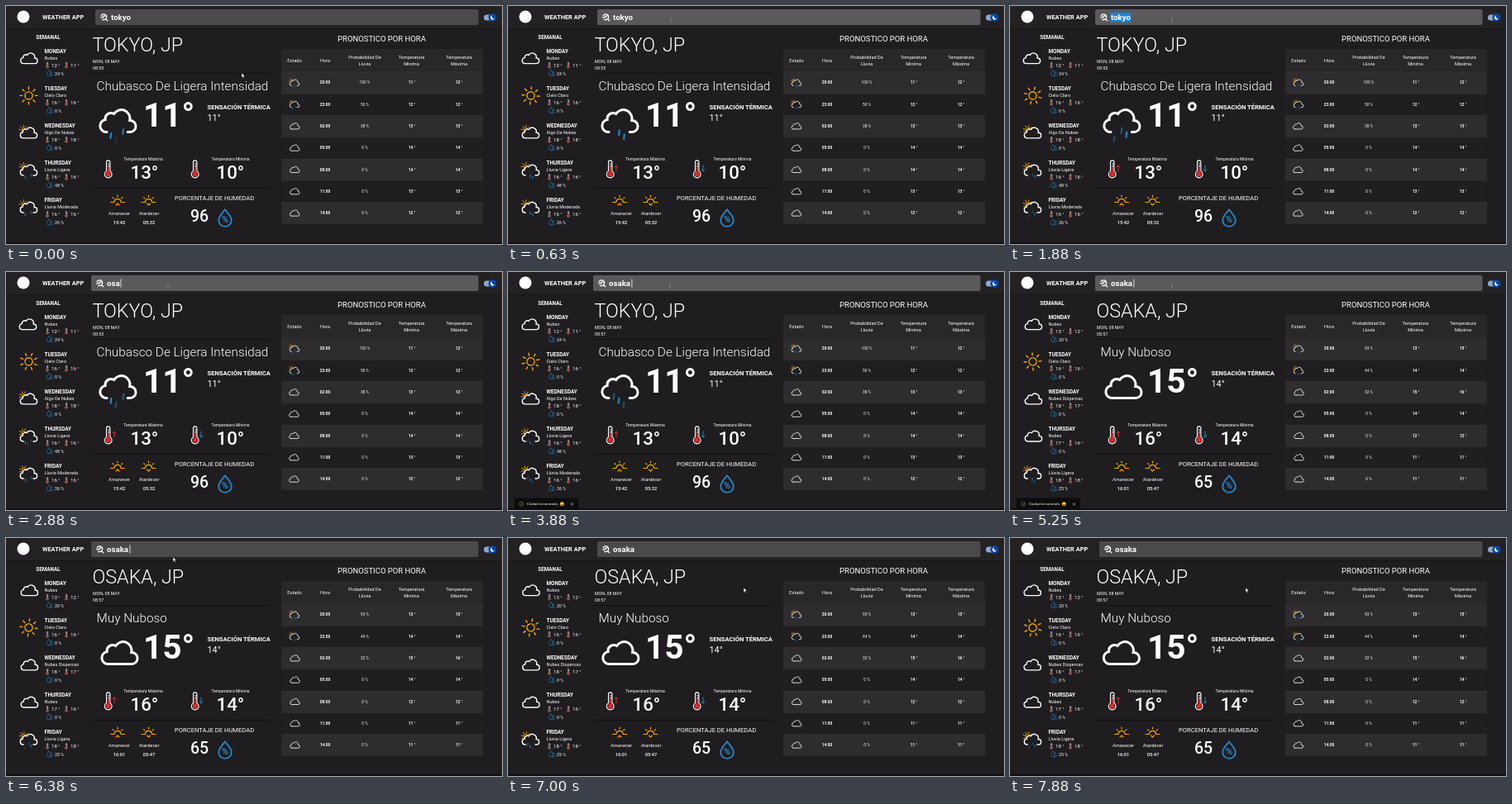
An HTML page for the animation above (8010 ms loop, 600 by 288 pixels).

```html
<!DOCTYPE html>
<html lang="es">
<head>
<meta charset="utf-8">
<title>Weather app</title>
<style>
html, body { margin: 0; width: 100%; height: 100%; overflow: hidden; background: #1f1d1f; }
svg { display: block; width: 600px; height: 288px; font-family: Roboto, "Liberation Sans", sans-serif; }
</style>
</head>
<body>
<svg id="stage" viewBox="0 0 600 288"></svg>
<script>
const LOOP = 8010, STEP = 125, LAST = 63;
const PAGE = '#1f1d1f', BLUE = '#2885c7', ORANGE = '#f8a618', RED = '#e22b2b';

// Day: icon, description, max, min, rain. Hour: rain, min, max.
const tokyo = {
  city: 'TOKYO, JP', sky: 'Chubasco De Ligera Intensidad', icon: 'rain',
  now: 11, feels: 11, max: 13, min: 10, rise: '15:42', set: '05:32', humidity: 96,
  days: [['cloud', 'Nubes', 12, 11, 24], ['sun', 'Cielo Claro', 16, 16, 0],
    ['partly', 'Algo De Nubes', 18, 18, 0], ['shower', 'Lluvia Ligera', 16, 16, 48],
    ['shower', 'Lluvia Moderada', 16, 16, 26]],
  hours: [[100, 11, 12], [50, 12, 12], [38, 13, 13], [0, 14, 14], [0, 14, 14], [0, 13, 13], [0, 12, 12]]
};
const osaka = {
  city: 'OSAKA, JP', sky: 'Muy Nuboso', icon: 'cloud',
  now: 15, feels: 14, max: 16, min: 14, rise: '16:01', set: '05:47', humidity: 65,
  days: [['cloud', 'Nubes', 13, 12, 20], ['sun', 'Cielo Claro', 16, 16, 0],
    ['cloud', 'Nubes Dispersas', 18, 17, 0], ['cloud', 'Nubes', 17, 16, 0],
    ['shower', 'Lluvia Ligera', 18, 18, 25]],
  hours: [[93, 13, 15], [44, 14, 14], [32, 15, 16], [0, 14, 14], [0, 12, 12], [0, 11, 11], [0, 11, 11]]
};
const dayNames = ['MONDAY', 'TUESDAY', 'WEDNESDAY', 'THURSDAY', 'FRIDAY'];
const hourNames = ['20:00', '23:00', '02:00', '05:00', '08:00', '11:00', '14:00'];

// Pointer path: step, x, y
const path = [[0, 286, 84], [1, 286, 84], [3, 232, 42], [5, 197, 17], [10, 196, 17],
  [49, 196, 17], [51, 203, 26], [55, 286, 63], [63, 286, 63]];

const text = (x, y, size, str, weight = 400, anchor = 'start', fill = '#fff') =>
  `<text x="${x}" y="${y}" font-size="${size}" font-weight="${weight}" text-anchor="${anchor}" fill="${fill}">${str}</text>`;
const mid = (x, y, size, str, weight, fill) => text(x, y, size, str, weight, 'middle', fill);
const rect = (x, y, w, h, fill, r = 0) =>
  `<rect x="${x}" y="${y}" width="${w}" height="${h}" rx="${r}" fill="${fill}"/>`;
const circle = (x, y, r, fill) => `<circle cx="${x}" cy="${y}" r="${r}" fill="${fill}"/>`;
const line = (d, color, width, more = '') =>
  `<path d="${d}" fill="none" stroke="${color}" stroke-width="${width}" stroke-linecap="round" stroke-linejoin="round" ${more}/>`;
const at = (x, y, s, body, turn = 0) =>
  `<g transform="translate(${x} ${y}) scale(${s}) rotate(${turn})">${body}</g>`;

function rays(from, to, start, count) {
  let d = '';
  for (let i = 0; i < count; i++) {
    const a = (start + i * 45) * Math.PI / 180, c = Math.cos(a), s = Math.sin(a);
    d += `M${c * from} ${s * from}L${c * to} ${s * to}`;
  }
  return d;
}

// Weather icons live on a 64 x 64 grid.
const sun = (x, y, s, width, t) => at(x, y, s,
  `<circle r="9.7" fill="none" stroke="${ORANGE}" stroke-width="${width}"/>` +
  line(rays(16.3, 22.5, 0, 8), ORANGE, width), t / 45000 * 360);

function cloud(shift, bg, open) {
  const base = open ? 'M43.7 45.5h2.8a7 7 0 0 0 0-14' : 'M18.5 45.5h28a7 7 0 0 0 0-14';
  return `<path transform="translate(${shift} 0)" d="${base}h-.3a10.5 10.5 0 0 0-19.1-8a7 7 0 0 0-10.6 6a7.2 7.2 0 0 0 .1 1.1A7.5 7.5 0 0 0 18 45.5h.5"
    fill="${bg}" stroke="#fff" stroke-width="3" stroke-linecap="round"/>`;
}

function drops(t) {
  return [24, 31, 38].map((x, i) => {
    const p = (t / 1500 + 0.6 + i / 3) % 1;
    return line(`M${x + 1.4 - 3 * p} ${38 + 15 * p}l-.8 6`, BLUE, 2.2, `opacity="${Math.min(1, 3 * p, 3 * (1 - p))}"`);
  }).join('');
}

function weather(kind, x, y, s, t, bg = PAGE) {
  const wet = kind === 'rain' || kind === 'shower';
  const drift = 3 - 6 * Math.abs((t + 1185) % 7000 / 3500 - 1);
  let body;
  if (kind === 'sun') body = sun(32, 32, 1, 3, t);
  else {
    body = kind === 'partly' || kind === 'shower' ? sun(19, 24, 0.51, 4, t) : '';
    body += cloud(kind === 'cloud' ? -drift : 0, bg, wet) + (wet ? drops(t) : '');
  }
  return at(x, y, s, `<g transform="translate(-32 -32)">${body}</g>`);
}

const thermometer = (x, y, s) => at(x, y, s,
  circle(0, 6, 2.9, RED) + line('M0-2V6', RED, 1.9) +
  line('M-2.2-8.4a2.2 2.2 0 0 1 4.4 0V2.2a4.4 4.4 0 1 1-4.4 0zM-.2-6.5h2.2M-.2-3.8h2.2', '#fff', 1.1));

const drop = (x, y, s) => at(x, y, s, line('M0-9C3-5 7.2-1 7.2 3A7.2 7 0 0 1-7.2 3C-7.2-1-3-5 0-9z', BLUE, 1.7));

const horizon = (x, y, down) => at(x, y, 1,
  line('M-8.5 0H-4.2A4.2 4.2 0 0 1 4.2 0H8.5', ORANGE, 1.2) +
  line(rays(6.6, 8.4, 225, 3), ORANGE, 1.2) +
  line(down ? 'M-2 1.5l2 2l2-2' : 'M-2 3.5l2-2l2 2', ORANGE, 1.1));

function header(step, t, hover) {
  const focus = step >= 10 && step < 55;
  const x = focus ? 103 : 108;
  const typed = [19, 21, 23, 24, 26].filter(s => step >= s).length;
  const word = typed ? 'osaka'.slice(0, typed) : 'tokyo';
  const selected = step >= 11 && !typed;
  const ends = [0, 6, 11.4, 17, 22.5, 28];
  let out = rect(0, 0, 600, 27, '#232123') + circle(21, 13, 7.5, '#fff') + text(44, 16.3, 7.4, 'WEATHER APP', 700);
  out += rect(x, 4, 571.5 - x, 19, hover ? '#5b595b' : '#4b494b', 2);
  out += at(x + 10.3, 13.3, 1, line('M-3.2-1.4A3.4 3.4 0 1 1-1.6 3M-3.6 .6H-.4V-1.2H1.6M2.6 2.8L4.4 4.4', '#fff', 1.3));
  if (selected) out += rect(x + 18.5, 8, 25, 11.5, '#1784dc');
  out += text(x + 19, 17, 9.7, word, 700);
  if (focus && typed && (t + 140) % 1000 < 530) out += rect(x + 18.5 + ends[typed], 8.5, 0.8, 10, '#fff');
  out += rect(578, 10.5, 13, 7, '#8fa7cf', 3.5) + circle(588.5, 14, 5, '#0c459d');
  return out + '<path d="M588 11.5a2.6 2.6 0 1 0 3 3.6a2.5 2.5 0 0 1-3-3.6z" fill="#fff"/>';
}

function week(data, t) {
  return mid(51, 40.3, 6.3, 'SEMANAL', 700) + data.days.map(([icon, sky, max, min, rain], i) => {
    const y = 57 + i * 45.1;
    return weather(icon, 27.5, y + 6.3, 0.47, t) + text(46.5, y, 6.4, dayNames[i], 700) +
      text(46.5, y + 8, 5.5, sky) +
      thermometer(50, y + 14.5, 0.34) + text(55, y + 16.5, 6.1, max + ' °') +
      thermometer(73, y + 14.5, 0.34) + text(78, y + 16.5, 6.1, min + ' °') +
      drop(52, y + 24, 0.36) + drop(55, y + 25, 0.28) + text(59, y + 26.5, 5.3, rain + ' %');
  }).join('');
}

function today(data, step, t) {
  const glow = `opacity="${Math.min(1, t % 2000 / 300)}"`;
  return rect(104, 81, 216, 1, '#131213') + rect(104, 220, 216, 1, '#131213') +
    text(104.5, 55, 23.3, data.city, 300) +
    text(105, 69, 5.3, 'MON, 08 MAY') + text(105, 76.5, 5.3, step < 29 ? '08:55' : '08:57') +
    text(109.5, 102, 15.3, data.sky, 300) + weather(data.icon, 135.5, 139, 1, t) +
    text(166, 145.5, 40.6, data.now + '°', 700) +
    text(243.5, 124.5, 7.6, 'SENSACIÓN TÉRMICA', 700) + text(243.5, 139, 10.8, data.feels + '°') +
    mid(166, 187, 5, 'Temperatura Máxima') + thermometer(123.7, 197.5, 1) +
    line('M131 200v-7m-2 2l2-2l2 2', RED, 1, glow) + text(150.5, 209.2, 22.3, data.max + '°', 500) +
    mid(271.5, 187, 5, 'Temperatura Mínima') + thermometer(228.7, 197.5, 1) +
    line('M236 193v7m-2-2l2 2l2-2', BLUE, 1, glow) + text(254.5, 209.2, 22.3, data.min + '°', 500) +
    horizon(135, 237.5, false) + horizon(172.5, 237.5, true) +
    mid(137, 252.5, 5.7, 'Amanecer') + mid(173, 252.5, 5.7, 'Atardecer') +
    mid(137, 263.5, 5.7, data.rise, 500) + mid(173, 263.5, 5.7, data.set, 500) +
    text(204, 235, 7.6, 'PORCENTAJE DE HUMEDAD') + text(223, 260.8, 19.5, data.humidity, 500) +
    drop(265, 256, 1.08) + mid(265, 262, 11, '%', 700, BLUE);
}

function table(data, t) {
  const top = 79.7, h = 26.3, head = (x, a, b) => mid(x, 63.5, 5.6, a) + mid(x, 71.5, 5.6, b);
  let out = mid(454.5, 43, 9.5, 'PRONOSTICO POR HORA') + rect(333, 52, 244, 28, '#292729') +
    mid(349, 67.7, 5.6, 'Estado') + mid(386, 67.7, 5.6, 'Hora') +
    head(434, 'Probabilidad De', 'Lluvia') + head(490.5, 'Temperatura', 'Mínima') + head(548, 'Temperatura', 'Máxima');
  data.hours.forEach(([rain, min, max], i) => {
    const y = top + i * h, mark = y + 14.6, bg = i % 2 ? '#201e20' : '#2e2c2e';
    out += rect(333, y, 244, h, bg) + rect(333, y, 244, 0.6, '#363436') +
      weather(i < 2 ? 'shower' : 'cloud', 349, y + 13, 0.27, t, bg) +
      mid(386, mark, 4.8, hourNames[i], 700) + mid(434, mark, 4.8, rain + ' %') +
      mid(491, mark, 4.9, min + ' °', 700) + mid(548, mark, 4.9, max + ' °', 700);
  });
  return out;
}

function toast(step) {
  if (step < 29 || step > 47) return '';
  const y = step === 29 || step === 47 ? 7 : 0;
  return at(0, y, 1, rect(8, 273.5, 77, 14.5, '#0d0c0d', 1) +
    line('M18.2 279.3a2.6 2.6 0 1 0 .5 1.7M15 280.7l1 1l2.4-2.6', '#78917b', 0.6) +
    text(23, 282.4, 4.4, 'Ciudad encontrada') +
    circle(65.3, 280.8, 2.5, '#f5bd35') + '<path d="M63.7 281.2h3.2a1.6 1.6 0 0 1-3.2 0z" fill="#7d3b17"/>' +
    line('M76.2 279.6l2.6 2.6m0-2.6l-2.6 2.6', '#ddd', 0.6));
}

function pointerAt(step) {
  const i = Math.max(1, path.findIndex(p => p[0] >= step));
  const [s0, x0, y0] = path[i - 1], [s1, x1, y1] = path[i];
  const k = (step - s0) / (s1 - s0);
  return [x0 + (x1 - x0) * k, y0 + (y1 - y0) * k];
}

function pointer(x, y, hover) {
  if (hover) return line(`M${x} ${y - 3}v6`, '#999', 0.6);
  return `<path transform="translate(${x - 1} ${y - 3})" d="M0 0V5.6L1.3 4.4L2.2 6.4L3.2 6L2.3 4H4z" fill="#fff" stroke="#000" stroke-width=".4"/>`;
}

const stage = document.getElementById('stage');
let shown = -1;

function draw(now) {
  const step = Math.min(LAST, Math.floor(now % LOOP / STEP));
  if (step === shown) return;
  shown = step;
  const t = step * STEP, data = step < 37 ? tokyo : osaka;
  const [x, y] = pointerAt(step), hover = y < 23;
  stage.innerHTML = rect(0, 0, 600, 288, PAGE) + header(step, t, hover) + rect(0, 27, 600, 0.8, '#171517') +
    week(data, t) + today(data, step, t) + table(data, t) +
    rect(0, 286, 600, 2, '#111011') + toast(step) + pointer(x, y, hover);
}

const start = performance.now();
function tick() {
  draw(performance.now() - start);
  requestAnimationFrame(tick);
}
tick();
</script>
</body>
</html>
```
